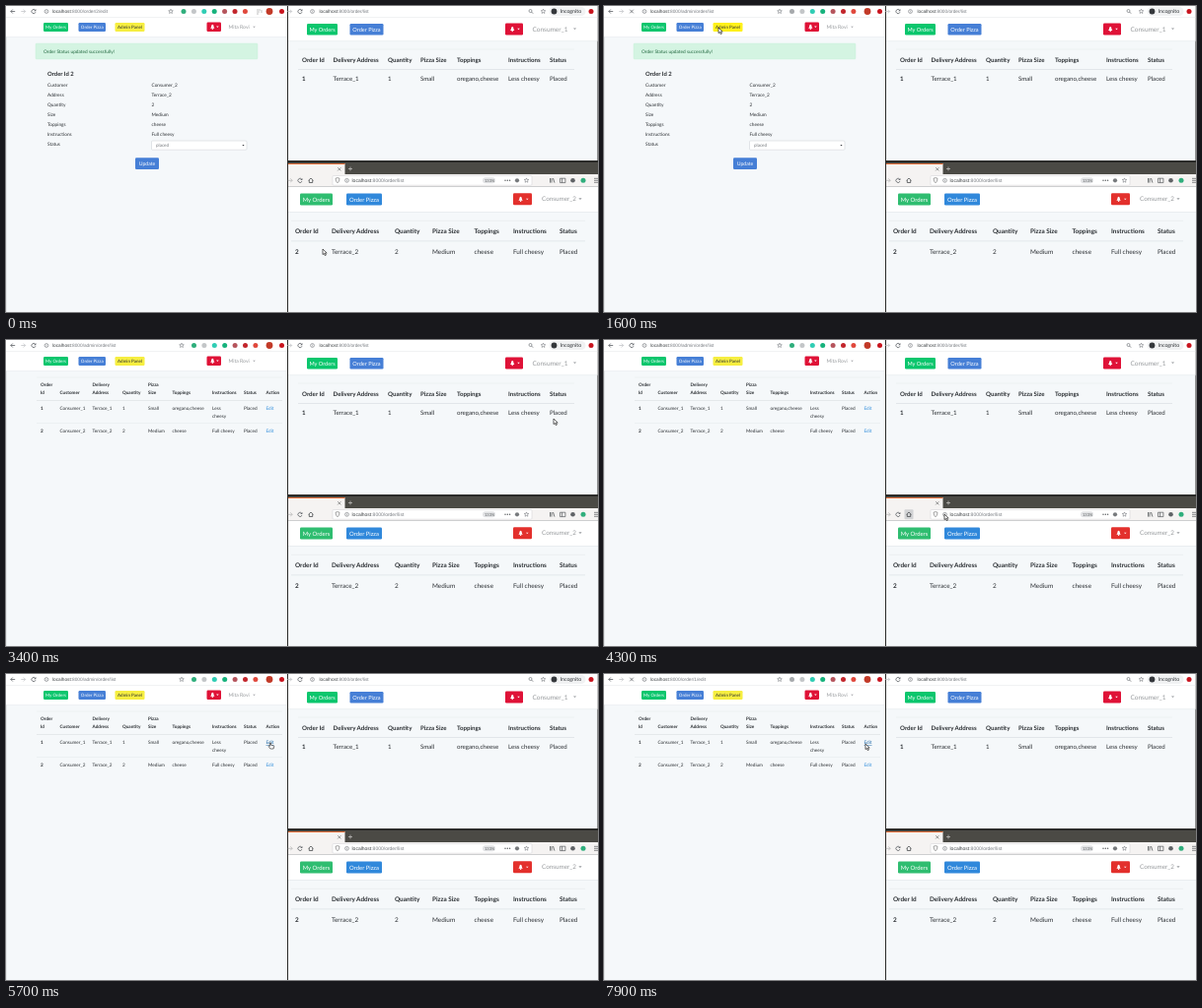
Animation of 600x311 px, one loop 8 s. Source, as an HTML page:

```html
<!DOCTYPE html>
<html lang="en">
<head>
<meta charset="utf-8">
<title>Pizza order status</title>
<style>
  html, body { margin: 0; width: 100%; height: 100%; overflow: hidden; background: #f5f8fa; }
  svg { display: block; width: 100vw; height: 100vh; }
  text { font-family: Lato, "Open Sans", sans-serif; white-space: pre; text-rendering: geometricPrecision; }
  .url { font-family: "Liberation Sans", Arial, sans-serif; }
</style>
</head>
<body>
<svg id="stage" viewBox="0 0 600 311"></svg>
<script>
const LOOP = 8000;
const INK = '#2a2e32', MUTED = '#96999c', PAGE = '#f5f8fa', RULE = '#dee2e6';
const GREEN = '#0bc66d', BLUE = '#467fd6', RED = '#df1237', ALERT = '#c8141e';

const rect = (x, y, w, h, fill, extra = '') =>
  `<rect x="${x}" y="${y}" width="${w}" height="${h}" fill="${fill}" ${extra}/>`;
const dot = (x, y, r, fill) => `<circle cx="${x}" cy="${y}" r="${r}" fill="${fill}"/>`;
const stroke = (d, color = '#5f6368', width = 0.8) =>
  `<path d="${d}" fill="none" stroke="${color}" stroke-width="${width}"/>`;
const fillPath = (d, color) => `<path d="${d}" fill="${color}"/>`;
// Text is placed by its visual middle line.
const label = (x, y, s, size, fill = INK, extra = '') =>
  `<text x="${x}" y="${y + size * 0.34}" font-size="${size}" fill="${fill}" ${extra}>${s}</text>`;
const bold = (x, y, s, size) => label(x, y, s, size, INK, 'font-weight="700"');
const rule = (x1, x2, y, w = 0.4) => stroke(`M${x1} ${y}H${x2}`, RULE, w);
const group = (id, body) => `<g id="${id}">${body}</g>`;

const button = (x, y, w, h, fill, s, size, ink = '#fff', id = '') =>
  rect(x, y, w, h, fill, `rx="1.2" ${id && `id="${id}"`}`) +
  label(x + w / 2, y + h / 2, s, size, ink, 'text-anchor="middle"');
const caret = (x, y, fill, r = 1.4) => fillPath(`M${x - r} ${y - r / 2}h${2 * r}l${-r} ${r}z`, fill);
const bell = (x, y, w, h, fill) => {
  const cx = x + w * 0.4, cy = y + h / 2;
  return rect(x, y, w, h, fill, 'rx="1.2"') +
    fillPath(`M${cx - 2.2} ${cy + 1.5}q1-.9 1-2.3q.1-1.6 1.2-1.8q1.1 .2 1.2 1.8q0 1.4 1 2.3z`, '#fff') +
    dot(cx, cy + 2, 0.7, '#fff') + caret(x + w * 0.75, cy, '#fff', 1.3);
};

const reload = (x, y) =>
  stroke(`M${x + 1.7} ${y - 1.2}A2.1 2.1 0 1 0 ${x + 2} ${y + 0.7}`) +
  fillPath(`M${x + 2.4} ${y - 2.4}v2.2h-2.2z`, '#5f6368');
const arrow = (x, y, dir, color) =>
  stroke(`M${x - 2.2} ${y}h4.4M${x + dir * 0.2} ${y - 2}l${dir * 2} 2l${-dir * 2} 2`, color);
const info = (x, y) => `<circle cx="${x}" cy="${y}" r="1.9" fill="none" stroke="#6b6e72" stroke-width=".6"/>` +
  stroke(`M${x} ${y - 0.3}v1.2M${x} ${y - 1.1}v.4`, '#6b6e72', 0.5);
const star = (x, y) => {
  const pts = [...Array(10).keys()].map(i => {
    const r = i % 2 ? 1.1 : 2.4, a = i * Math.PI / 5 - Math.PI / 2;
    return `${x + r * Math.cos(a)} ${y + r * Math.sin(a)}`;
  });
  return stroke(`M${pts.join('L')}Z`, '#5f6368', 0.5);
};
const lens = (x, y) => `<circle cx="${x - 0.5}" cy="${y - 0.5}" r="1.5" fill="none" stroke="#5f6368" stroke-width=".6"/>` +
  stroke(`M${x + 0.6} ${y + 0.6}l1.5 1.5`);
const url = (x, y, path, port, size = 4.75) =>
  `<text class="url" x="${x}" y="${y + size * 0.34}" font-size="${size}" fill="#3c4043">localhost` +
  `<tspan fill="#777b80">:${port}${path}</tspan></text>`;

const EXTENSIONS = ['#2fae7c', '#c3c6c8', '#2fcdb4', '#16b27c', '#b5545c', '#c2252b', '#e0483c'];
const extensions = (x, first) =>
  EXTENSIONS.map((c, i) => dot(x + i * 10.4, 5.5, 2.5, i ? c : first)).join('');

function adminChrome() {
  return rect(0, 0, 285, 11, '#fff') +
    arrow(7, 5.5, -1, '#5f6368') + arrow(17.5, 5.5, 1, '#c3c5c8') +
    group('reload', reload(28, 5.5)) +
    group('stop', stroke('M26.2 3.7l3.6 3.6M29.8 3.7l-3.6 3.6')) + info(41, 5.5) +
    group('editIcons', star(167, 5.5) + extensions(180, EXTENSIONS[0]) +
      stroke('M254 4h4M254 6h3M254 8h2M259 4v3', '#999', 0.6)) +
    group('listIcons', star(178, 5.5) + extensions(190.5, EXTENSIONS[0])) +
    group('loadIcons', star(178, 5.5) + extensions(190.5, '#a6a9ac')) +
    dot(267, 5.5, 3.4, '#c23a28') + dot(279.5, 5.5, 2.5, ALERT) +
    group('editUrl', url(47, 5.5, '/order/2/edit', 8000)) +
    group('listUrl', url(47, 5.5, '/admin/order/list', 8000)) +
    group('nextUrl', url(47, 5.5, '/order/1/edit', 8000));
}

function adminNav() {
  return rect(0, 11, 285, 20, '#fff') + rect(0, 11, 285, 0.5, '#e3e4e6') + rect(0, 31, 285, 0.6, '#e9edf0') +
    button(38, 17, 25, 9, GREEN, 'My Orders', 4.5) +
    button(73.5, 17, 27.5, 9, BLUE, 'Order Pizza', 4.5) +
    button(110.5, 17, 30, 9, '#f6ee40', 'Admin Panel', 4.5, INK, 'panelButton') +
    bell(203.5, 16.5, 14.5, 9.5, RED) +
    label(225.5, 21.3, 'Mita Rovi', 5.1, MUTED) + caret(251.5, 21.3, MUTED, 1.3);
}

function editPage() {
  const fields = [['Customer', 'Consumer_2'], ['Address', 'Terrace_2'], ['Quantity', '2'], ['Size', 'Medium'],
    ['Toppings', 'cheese'], ['Instructions', 'Full cheesy'], ['Status', '']];
  return rect(30, 38, 225, 16, '#d4f4e2', 'rx="1" stroke="#c3edd5" stroke-width=".4"') +
    label(38, 46, 'Order Status updated successfully!', 4.75, '#1d643b') +
    bold(42, 69, 'Order Id 2', 5.9) +
    fields.map(([name, value], i) =>
      label(42, 80 + i * 10.1, name, 4.75) + label(147.5, 80 + i * 10.1, value, 4.75)).join('') +
    rect(147.5, 137, 96.5, 9.2, '#fff', 'rx="1" stroke="#c8cdd2" stroke-width=".5"') +
    label(152, 141.6, 'placed', 4.6, '#75797d') + caret(240.5, 141.6, INK, 1.1) +
    button(131, 154.3, 24, 11.7, BLUE, 'Update', 5.2);
}

function listPage() {
  const cols = [35, 54.5, 87.5, 118, 144, 168.5, 209, 241, 263.5];
  const heads = ['Order|Id', 'Customer', 'Delivery|Address', 'Quantity', 'Pizza|Size', 'Toppings', 'Instructions', 'Status', 'Action'];
  const rows = [
    [69.5, '1', 'Consumer_1', 'Terrace_1', '1', 'Small', 'oregano,cheese', 'Less|cheesy', 'Placed'],
    [92.5, '2', 'Consumer_2', 'Terrace_2', '2', 'Medium', 'cheese', 'Full cheesy', 'Placed'],
  ];
  let out = rule(31, 280, 38) + rule(31, 280, 61.5, 0.7) + rule(31, 280, 84.5);
  heads.forEach((h, i) => {
    const lines = h.split('|');
    lines.forEach((s, k) => out += bold(cols[i], 53.7 - (lines.length - 1 - k) * 7.8, s, 4.65));
  });
  for (const [y, ...cells] of rows) {
    cells.forEach((c, i) => c.split('|').forEach((s, k) =>
      out += i ? label(cols[i], y + k * 7.8, s, 4.7) : bold(cols[i], y, s, 4.7)));
    out += label(263.5, y, 'Edit', 4.7, '#3490dc', y < 80 ? 'id="editLink"' : '');
  }
  return out;
}

function orderTable(cols, headY, rowY, size, cells, x1, x2) {
  const heads = ['Order Id', 'Delivery Address', 'Quantity', 'Pizza Size', 'Toppings', 'Instructions', 'Status'];
  return rule(x1, x2, headY - 10.5) + rule(x1, x2, headY + 10, 0.8) +
    heads.map((h, i) => bold(cols[i], headY, h, size)).join('') +
    cells.map((c, i) => (i ? label : bold)(cols[i], rowY, c, size)).join('');
}

function topWindow() {
  return rect(286, 0, 313.5, 157, PAGE) + rect(286, 0, 313.5, 11, '#fff') +
    arrow(287.5, 5.5, 1, '#c3c5c8') + reload(298, 5.5) + info(310.5, 5.5) + url(317.5, 5.5, '/order/list', 8000) +
    lens(532, 5.5) + star(544.5, 5.5) + rect(550.5, 1, 37, 9, '#f1f2f3', 'rx="4.5"') + dot(555.5, 5.5, 2.9, '#34373b') +
    label(561.5, 5.5, 'Incognito', 5.3, INK) + dot(593, 5.5, 2.5, ALERT) +
    rect(286, 11, 313.5, 24.5, '#fff') + rect(286, 11, 313.5, 0.5, '#e3e4e6') + rect(286, 35.5, 313.5, 0.6, '#e6eaed') +
    button(305, 18, 31, 11.5, GREEN, 'My Orders', 5.6) +
    button(348.5, 18, 34, 11.5, BLUE, 'Order Pizza', 5.6) +
    bell(506, 17.5, 18, 12, RED) +
    label(533.5, 23.5, 'Consumer_1', 6.5, MUTED) + caret(576.5, 23.3, MUTED, 1.6) +
    orderTable([300, 331.5, 387, 420, 457, 509, 551], 54.5, 73.7, 6.15,
      ['1', 'Terrace_1', '1', 'Small', 'oregano,cheese', 'Less cheesy', 'Placed'], 296, 576);
}

function bottomWindow() {
  return rect(286, 159, 314, 12, '#4b4a45') + rect(286, 160, 57.5, 11, '#f5f3f2') + rect(286, 160, 57.5, 1, '#e8703a') +
    stroke('M336.2 164.2l3.2 3.2M339.4 164.2l-3.2 3.2', '#555', 0.6) +
    stroke('M347 165.5h4M349 163.5v4', '#c9c8c4', 0.7) +
    rect(286, 171, 314, 12.5, '#f5f3f2') + arrow(288, 177.3, 1, '#bbb') + reload(298, 177.3) +
    rect(304.5, 172.3, 9, 10, '#d2d3d5', 'rx="1" id="homeHover"') +
    stroke('M306.5 177.3l2.5-2.3l2.5 2.3M307.3 177v2.5h3.4v-2.5', '#4a4d50', 0.8) +
    rect(331, 172.5, 202, 9.7, '#fff', 'rx="1" stroke="#cfcfd2" stroke-width=".5"') +
    stroke('M334 175.2l2-.6l2 .6q0 3.3-2 4.6q-2-1.3-2-4.6z', '#666', 0.6) + info(345.5, 177.3) +
    url(350.5, 177.3, '/order/list', 8000, 5) +
    rect(483, 174.3, 13, 6, '#e2e3e5', 'rx="3"') + label(485, 177.4, '133%', 4, '#55585b') +
    [506, 508.3, 510.6].map(x => dot(x, 177.3, 0.7, '#55585b')).join('') +
    dot(518, 177.3, 2.1, '#777a7d') + star(527.5, 177.3) +
    stroke('M551.5 175v4.6M553 175v4.6M554.5 175l1.4 4.6', '#55585b', 0.8) +
    stroke('M561.5 175.2h5.4v4.4h-5.4zM563.5 175.2v4.4', '#55585b', 0.7) +
    dot(574.5, 177.3, 2.3, '#606366') + dot(585, 177.3, 2.5, EXTENSIONS[0]) +
    stroke('M596 175.3h4M596 177.3h4M596 179.3h4', '#55585b', 0.7) +
    rect(286, 183.5, 314, 25.5, '#fff') + rect(286, 183, 314, 0.5, '#d5d6d8') +
    rect(286, 209, 314, 102, PAGE) + rect(286, 209, 314, 0.6, '#e3e7ea') +
    button(298, 190.5, 33, 12, '#2fbd70', 'My Orders', 5.9) +
    button(345, 190.5, 36, 12, '#3088db', 'Order Pizza', 5.9) +
    bell(514, 190.3, 19, 12, '#e3302c') +
    label(543, 196.3, 'Consumer_2', 6.3, MUTED) + caret(582, 196.1, MUTED, 1.6) +
    orderTable([293, 330, 394, 432, 474.5, 514, 561], 228.9, 249.8, 6.4,
      ['2', 'Terrace_2', '2', 'Medium', 'cheese', 'Full cheesy', 'Placed'], 289, 587);
}

const cursor = group('cursor',
  group('pointer', '<path d="M0 0v5.6l1.3-1.2l1 2.2l1.1-.5l-1-2.1h1.8z" fill="#fff" stroke="#222" stroke-width=".7"/>') +
  group('beam', stroke('M-1.3-3q1.3 0 1.3 .8v4.4q0 .8-1.3 .8M1.3-3q-1.3 0-1.3 .8v4.4q0 .8 1.3 .8', '#222', 0.7)) +
  group('hand', '<path d="M-.6 0q.6-.7 1.1 0v2.2l2.6 .5q.7 .3 .6 1l-.6 2.3h-3.2l-1.9-2.6q.3-.8 1.4 0z" fill="#fff" stroke="#222" stroke-width=".6"/>'));

document.getElementById('stage').innerHTML =
  rect(0, 0, 600, 311, '#2b2b29') + rect(0, 0, 285, 311, PAGE) + rect(0, 11, 0.6, 300, '#d9dcde') +
  adminChrome() + adminNav() + group('editPage', editPage()) + group('listPage', listPage()) +
  topWindow() + bottomWindow() + cursor;

const el = id => document.getElementById(id);
const show = (id, on) => el(id).setAttribute('visibility', on ? 'visible' : 'hidden');

// time, x, y of the cursor's hot spot
const TRAIL = [
  [0, 321, 247], [200, 321, 247], [1000, 118, 30], [1300, 116, 22], [1800, 116, 22],
  [2250, 59, 70], [2650, 59, 70], [3000, 250, 72], [3400, 555, 80], [3800, 480, 190],
  [4200, 345, 177], [4500, 345, 177], [5000, 330, 120], [5500, 268, 70], [6000, 268, 70],
  [6500, 266, 70], [7500, 266, 70], [7700, 265, 71], [8000, 265, 71],
];

function cursorAt(t) {
  const i = TRAIL.findIndex(k => k[0] > t);
  const [t0, x0, y0] = TRAIL[i - 1], [t1, x1, y1] = TRAIL[i];
  const u = (t - t0) / (t1 - t0), e = u * u * (3 - 2 * u);
  return [x0 + (x1 - x0) * e, y0 + (y1 - y0) * e];
}

function render(t) {
  const requested = t >= 1500, listed = t >= 1700, leaving = t >= 7700;
  const loading = (requested && !listed) || leaving;
  show('editPage', !listed);
  show('listPage', listed);
  show('editUrl', !requested);
  show('listUrl', requested && !leaving);
  show('nextUrl', leaving);
  show('reload', !loading);
  show('stop', loading);
  show('editIcons', !requested);
  show('listIcons', listed && !leaving);
  show('loadIcons', loading);

  const onLink = t >= 5400;
  el('editLink').setAttribute('text-decoration', onLink ? 'underline' : 'none');
  el('editLink').setAttribute('fill', onLink ? '#1d68a7' : '#3490dc');
  el('panelButton').setAttribute('fill', t >= 1200 && t < 1800 ? '#fff11a' : '#f6ee40');
  show('homeHover', t >= 4150 && t < 4500);

  const beam = t >= 2200 && t < 2700, hand = onLink && !leaving;
  show('beam', beam);
  show('hand', hand);
  show('pointer', !beam && !hand);
  el('cursor').setAttribute('transform', `translate(${cursorAt(t).join(' ')})`);
}

const start = performance.now();
function tick() {
  render((performance.now() - start) % LOOP);
  requestAnimationFrame(tick);
}
tick();
</script>
</body>
</html>
```
